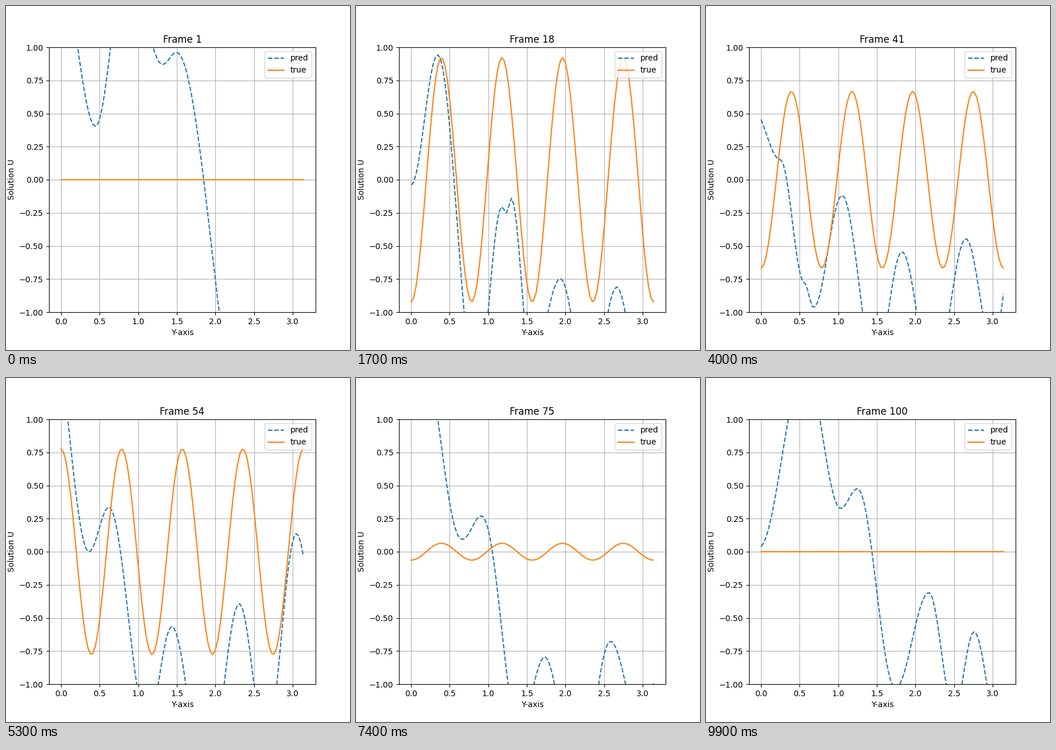
These frames come from a looping animation (600x600 px, 10 s). A matplotlib script:

```python
import numpy as np
import matplotlib.pyplot as plt
from matplotlib.animation import FuncAnimation

STEPS = 100
grid = np.linspace(0, np.pi, STEPS)

# Crests and troughs (y, u) of the prediction at a few steps.
TURNS = {
    0: [(0, 1.53), (.445, .403), (.85, 1.67), (1.315, .87), (1.495, .962),
        (2.4, -1.95)],
    17: [(0, -.04), (.345, .943), (.85, -1.6), (1.175, -.205), (1.237, -.25),
         (1.3, -.14), (1.56, -1.4), (1.935, -.747), (2.31, -1.65),
         (2.665, -.81), (2.985, -1.53)],
    40: [(-.12, .55), (.25, .15), (.56, -.78), (.68, -.965), (1.05, -.118),
         (1.48, -1.42), (1.825, -.543), (2.23, -1.55), (2.655, -.445),
         (3, -1.25), (3.3, -.4)],
    53: [(-.15, 1.8), (.36, 0), (.62, .337), (1.12, -1.3), (1.435, -.565),
         (1.88, -1.8), (2.31, -.393), (2.655, -1.45), (3.05, .137),
         (3.3, -.45)],
    65: [(-.05, .42), (.26, 1.2), (.775, -.462), (1.02, -.115), (1.5, -1.7),
         (1.845, -.953), (2.2, -1.8), (2.71, -.118), (2.985, -.818),
         (3.25, .2)],
    83: [(.05, 1.7), (.5, .38), (.795, .9), (1.305, -.94), (1.605, -.34),
         (2.05, -1.72), (2.44, -.885), (2.8, -1.8)],
    99: [(-.03, .03), (.57, 1.4), (1.03, .326), (1.25, .477), (1.74, -1.03),
         (2.175, -.308), (2.5, -1.2), (2.76, -.605), (3.1, -1.43)],
}


def locate(knots, t):
    """Index of the span holding t and the position 0..1 inside it."""
    i = np.clip(np.searchsorted(knots, t, side="right") - 1, 0, len(knots) - 2)
    s = (t - knots[i]) / (knots[i + 1] - knots[i])
    return i, np.clip(s, 0, 1)


def wave_through(turns):
    """Half cosines from each turning point to the next."""
    y, u = np.array(turns).T
    i, s = locate(y, grid)
    return u[i] + (u[i + 1] - u[i]) * (1 - np.cos(np.pi * s)) / 2


def true_wave(n):
    return np.sin(8 * grid[n]) * np.cos(8 * grid)


# The error drifts slowly, so it is blended and the true wave added back.
keys = np.array(list(TURNS), dtype=float)
errors = np.array([wave_through(p) - true_wave(n) for n, p in TURNS.items()])
drift = np.gradient(errors, keys, axis=0)


def error_at(n):
    i, s = locate(keys, n)
    h = keys[i + 1] - keys[i]
    ease = s * s * (3 - 2 * s)
    bend = (1 - s) * drift[i] - s * drift[i + 1]
    return errors[i] + ease * (errors[i + 1] - errors[i]) + h * s * (1 - s) * bend


fig, ax = plt.subplots(figsize=(6, 6), dpi=100)
pred, = ax.plot(grid, 0 * grid, "--", label="pred")
true, = ax.plot(grid, 0 * grid, label="true")
ax.set_xlim(-.05 * np.pi, 1.05 * np.pi)
ax.set_ylim(-1, 1)
ax.set_xlabel("Y-axis")
ax.set_ylabel("Solution U")
ax.grid(True)
ax.legend(loc="upper right")
title = ax.set_title("Frame 1")


def update(n):
    wave = true_wave(n)
    true.set_ydata(wave)
    pred.set_ydata(wave + error_at(n))
    title.set_text(f"Frame {n + 1}")
    return pred, true, title


anim = FuncAnimation(fig, update, frames=STEPS, interval=100, repeat=True)
plt.show()
```
